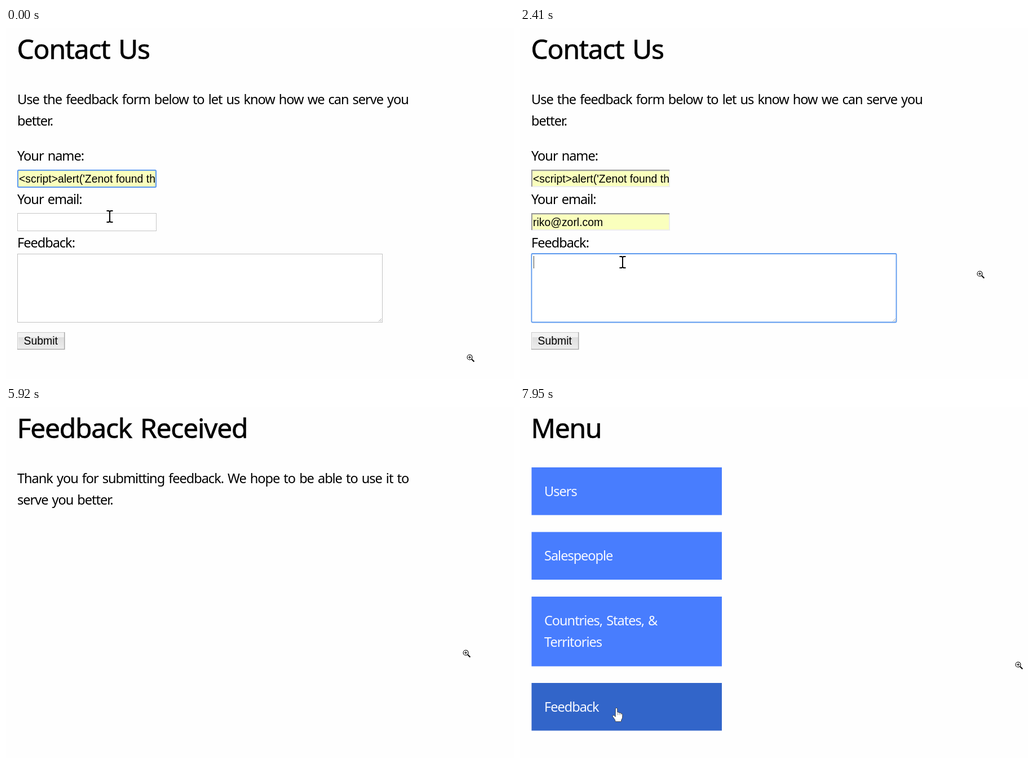
These frames come from a looping animation (901 by 622 pixels, 8000 ms). An HTML page with a canvas:

```html
<!DOCTYPE html>
<html lang="en">
<head>
<meta charset="utf-8">
<title>Contact form</title>
<style>
html, body { margin: 0; width: 100%; height: 100%; overflow: hidden; background: #fefefe; }
canvas { display: block; }
</style>
</head>
<body>
<canvas id="stage" width="901" height="622"></canvas>
<script>
const ctx = document.getElementById('stage').getContext('2d');
const LOOP = 8000;
const SANS = '"Noto Sans", "Open Sans", sans-serif';
const ARIAL = '"Liberation Sans", Arial, sans-serif';
const BLUE = '#487dfe', DARK_BLUE = '#3265c9', FOCUS = '#5b98ee', YELLOW = '#faffbd';
const NAME = "<script>alert('Zenot found this bug')";
const USER = 'riko', HOST = '@zorl.com', EMAIL = USER + HOST;

// [time, shape, x, y]: the pointer holds each place until the next one
const POINTER = [
  [0, 'beam', 184, 334], [150, null],
  [815, 'arrow', 164, 407], [930, 'arrow', 160, 384],
  [2000, 'beam', 172, 400], [2130, 'beam', 177, 409], [2270, 'beam', 182, 415],
  [3270, 'arrow', 89, 551],
  [3800, 'arrow', 150, 490], [3870, 'arrow', 300, 335], [4040, 'arrow', 415, 215],
  [4210, 'arrow', 455, 120], [4400, 'arrow', 500, 20], [4580, 'arrow', 560, 40],
  [4760, 'arrow', 611, 100],
  [4910, 'arrow', 540, 250], [5030, 'arrow', 400, 380], [5150, 'arrow', 336, 400],
  [5260, 'arrow', 420, 200], [5380, 'arrow', 500, -21],
  [5690, 'arrow', 515, -21], [5920, null]
];
const LENS = [
  [0, 824, 585], [150, 817, 437], [7360, 850, 447], [7440, 880, 455],
  [7530, 896, 458], [7610, 920, 458], [7950, 885, 458]
];
const BUTTONS = [
  [107, 84.5, 'Users'], [221.5, 84.5, 'Salespeople'],
  [336, 123.5, 'Countries, States, &', 'Territories'], [489, 84.5, 'Feedback']
];

const at = (list, t) => list.filter(step => step[0] <= t).pop();

function rect(x, y, w, h, color) {
  ctx.fillStyle = color;
  ctx.fillRect(x, y, w, h);
}

function frame(x, y, w, h, color, line = 1) {
  ctx.strokeStyle = color;
  ctx.lineWidth = line;
  ctx.strokeRect(x + line / 2, y + line / 2, w - line, h - line);
}

function text(str, x, y, font, color = '#000', letter = 0, word = 0) {
  ctx.font = font;
  ctx.letterSpacing = letter + 'px';
  ctx.wordSpacing = word + 'px';
  ctx.fillStyle = color;
  ctx.fillText(str, x, y);
}

function heading(str) {
  text(str, 19.5, 54.5, `48px ${SANS}`, '#000', -1.25, 3.5);
  ctx.strokeStyle = '#000';
  ctx.lineWidth = 0.6;
  ctx.strokeText(str, 19.5, 54.5);
}

const body = (str, y, x = 20, color = '#000') =>
  text(str, x, y, `23.6px ${SANS}`, color, -1.05, 2);
const typed = (str, x, y, color) => text(str, x, y, `19.4px ${ARIAL}`, color);

function shape(points, fill, stroke, line = 1) {
  ctx.beginPath();
  points.forEach(([x, y]) => ctx.lineTo(x, y));
  ctx.closePath();
  ctx.fillStyle = fill;
  ctx.fill();
  ctx.strokeStyle = stroke;
  ctx.lineWidth = line;
  ctx.stroke();
}

function field(y, value, focused) {
  const fill = value ? YELLOW : '#fff';
  if (focused) {
    ctx.beginPath();
    ctx.roundRect(21, y + 1, 245, 30, 1.5);
    ctx.fillStyle = fill;
    ctx.fill();
    ctx.strokeStyle = FOCUS;
    ctx.lineWidth = 2;
    ctx.stroke();
  } else if (value) {
    rect(20, y, 246, 31, '#ededed');
    rect(20, y, 245, 2.5, '#999');
    rect(20, y, 2, 30, '#999');
    rect(22, y + 2.5, 242, 26.5, fill);
  } else {
    rect(20, y, 247, 32, '#fff');
    frame(20, y, 247, 32, '#c6c6c6');
  }
}

function clipped(y, draw) {
  ctx.save();
  ctx.beginPath();
  ctx.rect(22, y, 242.5, 30);
  ctx.clip();
  draw();
  ctx.restore();
}

function emailField(t) {
  const focused = t >= 70 && t < 2410;
  const suggested = t >= 1560 && t < 1860;
  field(328, t >= 1560, focused);
  if (t >= 70 && t < 700) rect(24, 333, 1, 22, '#444');
  if (t < 700) return;
  if (t < 1860) {
    typed(USER, 23, 351);
    if (suggested) {
      const x = 23 + ctx.measureText(USER).width;
      rect(x, 333, ctx.measureText(HOST).width, 22, '#388ff0');
      typed(HOST, x, 351, '#fff');
    }
    rect(21, 359, 244, 37.5, '#d3d3d3');
    rect(21.5, 360, 242.5, 36, suggested ? '#bcdcf5' : '#fff');
    text(EMAIL, 33, 383.5, `bold 16.3px "Open Sans", ${SANS}`);
  } else {
    typed(EMAIL, 23, 351);
  }
}

function textArea(t) {
  const focused = t >= 2410;
  rect(20, 400, 648, 122, '#fff');
  if (focused) {
    ctx.beginPath();
    ctx.roundRect(20.5, 400, 647, 121.5, 1.5);
    ctx.strokeStyle = FOCUS;
    ctx.lineWidth = 1.8;
    ctx.stroke();
  } else {
    frame(20, 400, 648, 122, '#c2c2c2');
  }
  ctx.strokeStyle = '#999';
  ctx.lineWidth = 0.8;
  ctx.beginPath();
  for (const d of [5, 2]) {
    ctx.moveTo(666 - d, 520);
    ctx.lineTo(666, 520 - d);
  }
  ctx.stroke();
  if (focused && t < 2960) rect(24, 404, 1, 22, '#444');
}

function submitButton() {
  rect(20, 539, 84.5, 31, '#a9a9a9');
  rect(20, 539, 83, 29.5, '#cdcdcd');
  rect(21, 540, 82, 28.5, '#f3f3f3');
  const g = ctx.createLinearGradient(0, 548, 0, 568);
  g.addColorStop(0, '#dedede');
  g.addColorStop(1, '#ececec');
  rect(22, 548, 81, 20, g);
  typed('Submit', 31.5, 561);
}

function formPage(t) {
  heading('Contact Us');
  body('Use the feedback form below to let us know how we can serve you', 134.5);
  body('better.', 173);
  body('Your name:', 234.5);
  field(251, true, t < 70);
  clipped(252, () => typed(NAME, 23, 274));
  body('Your email:', 311.5);
  body('Feedback:', 388.5);
  textArea(t);
  emailField(t);
  submitButton();
}

function thanksPage() {
  heading('Feedback Received');
  body('Thank you for submitting feedback. We hope to be able to use it to', 134.5);
  body('serve you better.', 173);
}

const inside = ([, , px, py], y, h) => px > 20 && px < 358 && py > y && py < y + h;

function menuPage(pointer) {
  heading('Menu');
  for (const [y, h, ...lines] of BUTTONS) {
    const hover = pointer && inside(pointer, y, h);
    rect(20.5, y, 337.5, h, hover ? DARK_BLUE : BLUE);
    lines.forEach((line, i) => body(line, y + 50.5 + i * 38.4, 43, '#f6f8ff'));
  }
}

function menuPointer(t) {
  if (t < 6850) return null;
  if (t >= 7950) return [t, 'hand', 171, 534];
  const step = Math.min(11, Math.floor((t - 6850) / 84.5));
  const k = step / 11, e = k * k * (3 - 2 * k);
  const p = [t, 'arrow', 545 - 367 * e, 105 + 358 * e];
  if (BUTTONS.some(([y, h]) => inside(p, y, h))) p[1] = 'hand';
  return p;
}

const cursors = {
  arrow() {
    shape([[0.5, 0.5], [0.5, 19], [4.6, 15.2], [7.6, 22.2], [10.6, 20.8], [7.6, 14], [13.6, 13.6]],
      '#fff', '#666');
  },
  beam() {
    ctx.strokeStyle = '#000';
    ctx.lineWidth = 2;
    ctx.beginPath();
    ctx.moveTo(0, -9);
    ctx.lineTo(0, 9);
    for (const s of [-1, 1]) {
      ctx.moveTo(-5.5, 10 * s);
      ctx.lineTo(-1.5, 10 * s);
      ctx.lineTo(0, 8.5 * s);
      ctx.lineTo(1.5, 10 * s);
      ctx.lineTo(5.5, 10 * s);
    }
    ctx.stroke();
  },
  hand() {
    ctx.lineJoin = 'round';
    shape([[-1.6, 0], [0, -0.8], [1.6, 0], [1.8, 7], [4.5, 7], [5, 8], [7.5, 8], [8.2, 9.2],
      [10, 9.5], [10.8, 11], [10.6, 17], [8.6, 21], [8.4, 23.5], [-1.8, 23.5], [-2.4, 20.5],
      [-7, 14], [-6, 12.2], [-4, 12.6], [-1.8, 15]], '#fff', '#333', 0.8);
    ctx.strokeStyle = '#777';
    ctx.beginPath();
    for (const x of [1.9, 5, 8]) {
      ctx.moveTo(x, 8);
      ctx.lineTo(x, 12);
    }
    ctx.stroke();
    ctx.lineJoin = 'miter';
  }
};

function drawAt(x, y, draw) {
  ctx.save();
  ctx.translate(x, y);
  draw();
  ctx.restore();
}

function lens() {
  ctx.strokeStyle = '#000';
  ctx.lineWidth = 1.1;
  ctx.beginPath();
  ctx.arc(-1.5, -1.5, 4.5, 0, 7);
  ctx.fillStyle = '#fff';
  ctx.fill();
  ctx.stroke();
  rect(-4, -2, 5, 1, '#000');
  rect(-2, -4, 1, 5, '#000');
  ctx.lineWidth = 2;
  ctx.beginPath();
  ctx.moveTo(2, 2);
  ctx.lineTo(6.3, 6.3);
  ctx.stroke();
}

function render(t) {
  rect(0, 0, 901, 622, '#fefefe');
  const pointer = t < 6770 ? at(POINTER, t) : menuPointer(t);
  if (t < 3420) formPage(t);
  else if (t < 6770) thanksPage();
  else menuPage(pointer);
  const [, lx, ly] = at(LENS, t);
  drawAt(lx, ly, lens);
  if (pointer && pointer[1]) drawAt(pointer[2], pointer[3], cursors[pointer[1]]);
}

const start = performance.now();
function tick() {
  render((performance.now() - start) % LOOP);
  requestAnimationFrame(tick);
}
tick();
</script>
</body>
</html>
```
